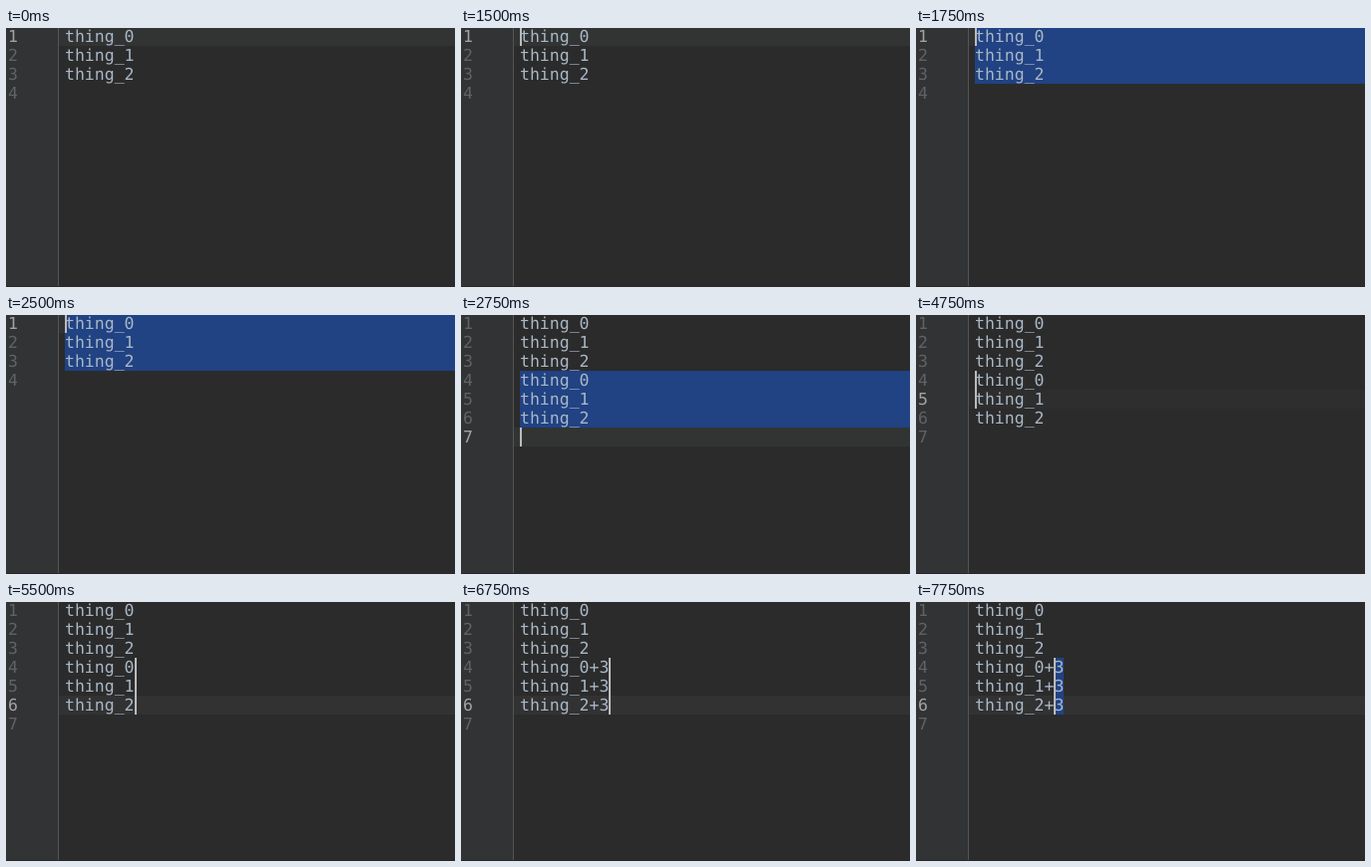
Animation, 450 px wide and 260 px high, one loop 8 s. Source, as an HTML page:

```html
<!DOCTYPE html>
<html lang="en">
<head>
<meta charset="utf-8">
<title>Multiple carets</title>
<style>
  html, body { margin: 0; width: 100%; height: 100%; overflow: hidden; background: #2b2b2b; }
  svg { display: block; width: 450px; height: 260px; }
  text {
    font: 16.5px "DejaVu Sans Mono", monospace;
    fill: #a9b7c6;
    white-space: pre;
    text-rendering: geometricPrecision;
  }
  .number { fill: #606366; }
  .number.current { fill: #a4a3a3; }
  .selection { fill: #214283; }
  .caret { fill: #bbbbbb; }
</style>
</head>
<body>
<svg viewBox="0 0 450 260">
  <rect width="450" height="260" fill="#2b2b2b"/>
  <rect width="52" height="260" fill="#313335"/>
  <rect x="52" width="1" height="260" fill="#555555"/>
  <rect y="259" width="450" height="1" fill="#2a2627"/>
  <g id="editor"></g>
</svg>
<script>
const LOOP = 8000, WIDTH = 450, LEFT = 59, ROW = 19, CHAR = 9.93;
const editor = document.getElementById("editor");

// Each step changes only the listed parts of the editor state.
const steps = [
  { at: 0, lines: 3, suffix: "", row: 0, column: 0, carets: [], selected: null, highlight: "#323434" },
  { at: 500, carets: [0] },
  { at: 1000, carets: [] },
  { at: 1500, carets: [0] },
  { at: 1750, selected: { rows: [0, 1, 2] } },
  { at: 2000, carets: [] },
  { at: 2500, carets: [0] },
  { at: 2750, lines: 6, row: 6, carets: [6], selected: { rows: [3, 4, 5] } },
  { at: 3500, row: 3, carets: [3], selected: null, highlight: "#2e2e2e" },
  { at: 4000, carets: [] },
  { at: 4500, carets: [3] },
  { at: 4750, row: 4, carets: [3, 4] },
  { at: 5000, row: 5, carets: [3, 4, 5], highlight: "#323232" },
  { at: 5500, column: 7 },
  { at: 6250, suffix: "+", column: 8 },
  { at: 6750, suffix: "+3", column: 9 },
  { at: 7500, carets: [] },
  { at: 7750, column: 8, carets: [3, 4, 5], selected: { rows: [3, 4, 5], from: 8, to: 9 } }
];

const columnX = column => Math.round(LEFT + column * CHAR);
const rect = (x, row, width, attributes) =>
  `<rect x="${x}" y="${row * ROW - 1}" width="${width}" height="${ROW}" ${attributes}/>`;
const label = (x, row, content, name = "") =>
  `<text x="${x}" y="${row * ROW + 14}" class="${name}">${content}</text>`;

function draw(state) {
  const { lines, suffix, row, column, carets, selected, highlight } = state;
  let markup = rect(53, row, WIDTH - 53, `fill="${highlight}"`);

  if (selected) {
    const start = columnX(selected.from ?? 0);
    const end = selected.to ? columnX(selected.to) : WIDTH;
    for (const r of selected.rows) markup += rect(start, r, end - start, 'class="selection"');
  }
  for (let r = 0; r <= lines; r++) {
    markup += label(2, r, r + 1, r === row ? "number current" : "number");
    if (r < lines) markup += label(LEFT, r, `thing_${r % 3}${r > 2 ? suffix : ""}`);
  }
  for (const r of carets) markup += rect(columnX(column), r, 2, 'class="caret"');
  editor.innerHTML = markup;
}

const begin = performance.now();
let shown = -1;

function tick() {
  const time = (performance.now() - begin) % LOOP;
  const index = steps.filter(step => step.at <= time).length - 1;
  if (index !== shown) {
    shown = index;
    draw(Object.assign({}, ...steps.slice(0, index + 1)));
  }
  requestAnimationFrame(tick);
}
tick();
</script>
</body>
</html>
```
